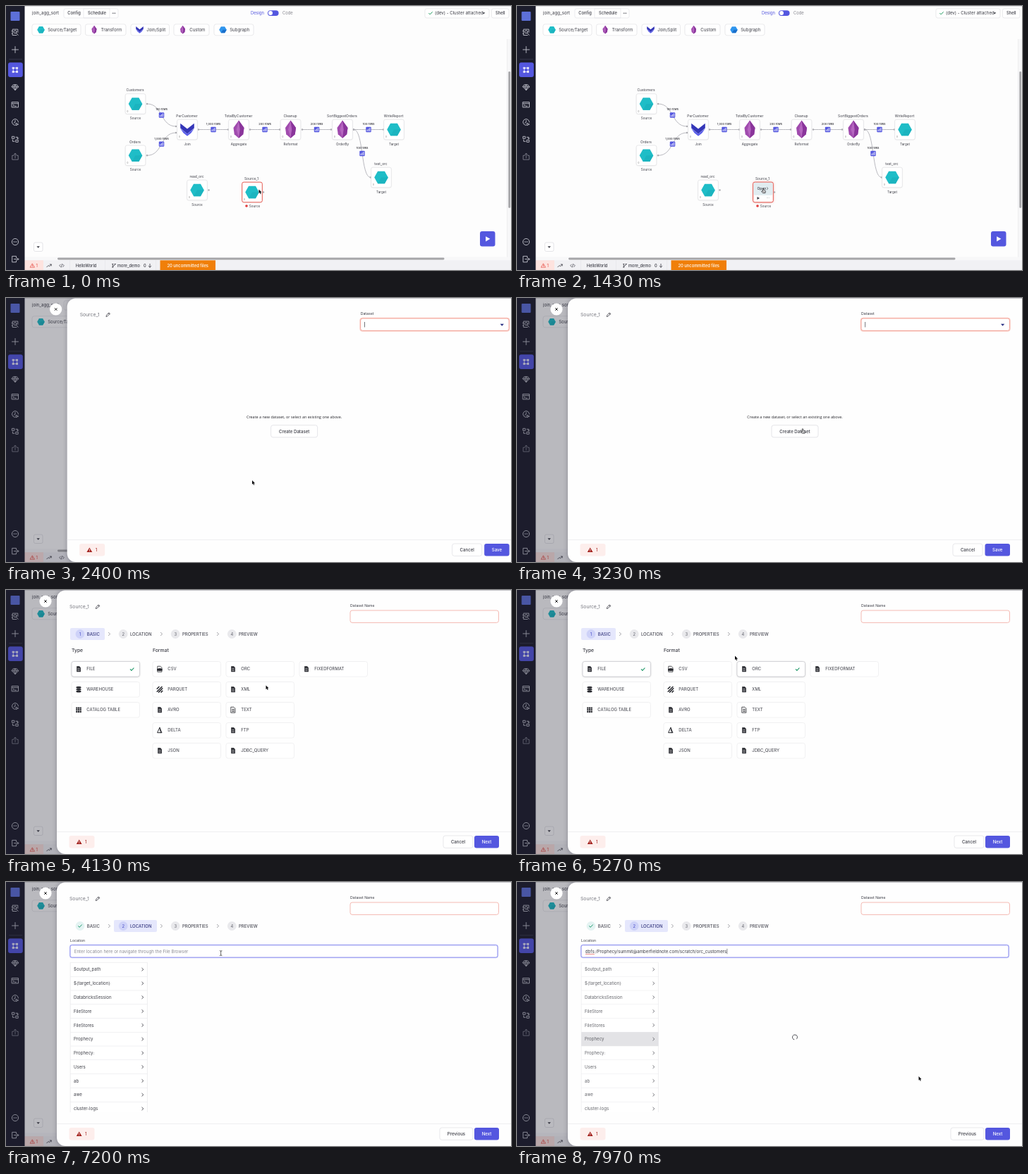
Write an HTML page with a canvas that moves like this. It is 716 px wide and 375 px high and loops after 8000 ms.

```html
<!DOCTYPE html>
<html lang="en">
<head>
<meta charset="utf-8">
<title>Pipeline editor</title>
<style>
  html, body { margin: 0; width: 100%; height: 100%; overflow: hidden; background: #fff; }
  canvas { display: block; width: 716px; height: 375px; }
</style>
</head>
<body>
<canvas id="stage"></canvas>
<script>
const W = 716, H = 375, LOOP = 8000;
const INDIGO = '#5457df', INK = '#3b3c45', RED = '#e5483f';
const canvas = document.getElementById('stage');
const c = canvas.getContext('2d');
const dpr = window.devicePixelRatio || 1;
canvas.width = W * dpr;
canvas.height = H * dpr;

// Moments of the story, in ms
const T = { hover: 1340, open: 2133, wizard: 3500, orc: 4650, location: 6120, tab: 6200, list: 6650, focus: 7000, paste: 7600 };

const clamp = v => Math.max(0, Math.min(1, v));
const span = (t, from, length) => clamp((t - from) / length);
const ease = p => p < .5 ? 2 * p * p : 1 - 2 * (1 - p) * (1 - p);

function rect(x, y, w, h, r, fill, stroke, lw = .6) {
  c.beginPath();
  c.roundRect(x, y, w, h, r);
  paint(fill, stroke, lw);
}
function paint(fill, stroke, lw = .8) {
  if (fill) { c.fillStyle = fill; c.fill(); }
  if (stroke) { c.strokeStyle = stroke; c.lineWidth = lw; c.stroke(); }
}
function circle(x, y, r, fill, stroke, lw) {
  c.beginPath();
  c.arc(x, y, r, 0, Math.PI * 2);
  paint(fill, stroke, lw);
}
function poly(points, fill) {
  c.beginPath();
  for (let i = 0; i < points.length; i += 2) c.lineTo(points[i], points[i + 1]);
  c.closePath();
  paint(fill);
}
function icon(x, y, d, fill, stroke, lw, scale = 1) {
  c.save();
  c.translate(x, y);
  c.scale(scale, scale);
  const path = new Path2D(d);
  c.lineJoin = c.lineCap = 'round';
  if (fill) { c.fillStyle = fill; c.fill(path); }
  if (stroke) { c.strokeStyle = stroke; c.lineWidth = lw || .8; c.stroke(path); }
  c.restore();
}
// y is the middle of the capital letters
function text(s, x, y, size, color = INK, align = 'left', weight = 400, family = 'Inter') {
  c.font = `${weight} ${size}px ${family}, sans-serif`;
  c.textAlign = align;
  c.fillStyle = color;
  c.fillText(s, x, y + size * .36);
}
const shadow = (color, blur, y = 0) => {
  c.shadowColor = color;
  c.shadowBlur = blur * dpr;
  c.shadowOffsetY = y * dpr;
};
const noShadow = () => shadow('transparent', 0);

const CHECK = 'M-2.4 .1L-.8 1.8L2.4 -1.7';
const CHEVRON = 'M-1 -1.9L1 0L-1 1.9';
const DOWN = 'M-2.2 -1.1H2.2L0 1.4Z';
const PLAY = 'M-1.5 -2L2 0L-1.5 2Z';

function hexagon(x, y, s) {
  poly([x - s, y, x - s / 2, y - s * .9, x + s / 2, y - s * .9, x + s, y, x + s / 2, y + s * .9, x - s / 2, y + s * .9], '#1fbdc7');
  poly([x, y, x + s, y, x + s / 2, y + s * .9, x - s / 2, y + s * .9], '#1bb4bf');
}
function gem(x, y, s) {
  poly([x, y - s, x + s * .58, y - s * .2, x + s * .48, y + s * .52, x, y + s * .95, x - s * .48, y + s * .52, x - s * .58, y - s * .2], '#a04bae');
  poly([x, y - s, x + s * .14, y, x, y + s * .95, x - s * .26, y], '#b566c0');
  poly([x, y - s, x + s * .58, y - s * .2, x + s * .48, y + s * .52, x, y + s * .95, x + s * .14, y], '#8a359b');
}
function joinMark(x, y, s) {
  poly([x - s, y - s * .15, x, y + s * .6, x + s, y - s * .15, x + s * .55, y + s * .5, x, y + s * .95, x - s * .55, y + s * .5], '#5a5eea');
  poly([x - s, y - s * .9, x, y - s * .1, x + s, y - s * .9, x + s, y - s * .2, x, y + s * .6, x - s, y - s * .2], '#3436b8');
}
function cube(x, y, s) {
  poly([x - s, y, x - s / 2, y - s * .85, x + s / 2, y - s * .85, x + s, y, x + s / 2, y + s * .85, x - s / 2, y + s * .85], '#2f95ee');
  poly([x, y, x + s, y, x + s / 2, y + s * .85, x - s / 2, y + s * .85], '#1b6fcb');
}

const nodes = [
  ['Customers', 'Source', 183.5, 139, hexagon], ['Orders', 'Source', 183.5, 212.3, hexagon],
  ['PerCustomer', 'Join', 257, 175.5, joinMark], ['TotalByCustomer', 'Aggregate', 330, 175.5, gem],
  ['Cleanup', 'Reformat', 403.5, 175.5, gem], ['SortBiggestOrders', 'OrderBy', 477, 175.5, gem],
  ['WriteReport', 'Target', 550, 175.5, hexagon], ['test_orc', 'Target', 532, 243.5, hexagon],
  ['read_orc', 'Source', 271, 261.5, hexagon]
];
const edges = [
  [200, 139, 241, 171, '100 rows'], [200, 212.3, 241, 180, '1,000 rows'],
  [273, 175.5, 315, 175.5, '1,000 rows'], [346, 175.5, 388, 175.5, '200 rows'],
  [420, 175.5, 461, 175.5, '200 rows'], [493, 175.5, 535, 175.5, '100 rows'],
  [493, 175.5, 517, 243.5, '100 rows']
];

function drawEdge([x1, y1, x2, y2, rows]) {
  const mx = (x1 + x2) / 2, my = (y1 + y2) / 2;
  c.beginPath();
  c.moveTo(x1, y1);
  c.bezierCurveTo(mx + 2, y1, mx - 2, y2, x2, y2);
  paint(null, '#a9a9b0', .8);
  circle(x1, y1, 1.2, '#aaaab0');
  circle(x2, y2, 1.2, '#aaaab0');
  rect(mx - 3.7, my - 3.7, 7.4, 7.4, 1, INDIGO);
  icon(mx, my, 'M-1.9 2V.5M0 2V-.7M1.9 2V-2', null, '#fff', .9);
  text(rows, mx, my - 8, 3.9, '#2c2c33', 'center', 500);
}
function drawBox(x, y, stroke) {
  shadow('rgba(0,0,0,.09)', 2, .5);
  rect(x - 14.3, y - 14.3, 28.6, 28.6, 2.5, '#fff', null);
  noShadow();
  rect(x - 14.3, y - 14.3, 28.6, 28.6, 2.5, null, stroke, stroke === RED ? .9 : .6);
}
function drawNode([name, kind, x, y, mark]) {
  drawBox(x, y, '#dcdce0');
  mark(x, y, mark === gem ? 13 : 9.8);
  text('0', x - 11, y + 10.5, 3, '#666', 'center');
  text(name, x - .5, y - 19.4, 4.9, INK, 'center');
  text(kind, x, y + 20.4, 4.6, INK, 'center');
}
function drawSource1(t) {
  const x = 349, y = 264.5, p = span(t, T.hover, 90), hovered = t < T.open;
  if (p && hovered) shadow('rgba(232,70,60,.5)', 3.5 * p);
  rect(x - 14.3, y - 14.3, 28.6, 28.6, 3, '#fff');
  noShadow();
  drawBox(x, y, RED);
  c.globalAlpha = 1 - p;
  hexagon(x, y, 9.8);
  text('0', x - 11, y + 10, 3, '#666', 'center');
  c.globalAlpha = p;
  if (p) {
    if (hovered) rect(x - 13.7, y - 13.7, 27.4, 18, 2, 'rgba(205,224,230,.6)');
    text('Open', x - 8.5, 259.2, 5, INK, 'left', 500);
    icon(355.2, 259.2, CHEVRON, null, INK, .8, .8);
    icon(342, 273, PLAY, INK);
    text('…', 356, 271.6, 5, INK, 'center');
  }
  c.globalAlpha = 1;
  circle(365, 264.5, 1.2, '#aaaab0');
  text('Source_1', x - 1, 245.2, 4.9, INK, 'center');
  circle(341, 284, 1.8, '#e23b3b');
  text('Source', 352.5, 284.4, 4.6, INK, 'center');
}

function drawEditor(t) {
  rect(26, 0, 690, 375, 0, '#fdfdfd');
  rect(26, 0, 690, .8, 0, '#d9d9dd');
  text('join_agg_sort', 37, 10, 6.1);
  rect(82, 3.8, 77, 13.2, 2.5, '#fff', '#e0e0e4');
  rect(110, 3.8, 37, 13.2, 0, null, '#e0e0e4');
  text('Config', 96.5, 10.2, 5.8, INK, 'center', 500);
  text('Schedule', 129, 10.2, 5.8, INK, 'center', 500);
  [-1.8, 0, 1.8].forEach(d => circle(153 + d, 10.2, .6, INK));
  text('Design', 347, 10, 5.8, INDIGO);
  rect(371, 6.2, 15.6, 7.8, 3.9, INDIGO);
  circle(375, 10.1, 3, '#fff');
  text('Code', 392, 10, 5.8, '#85858d');
  rect(594, 3.8, 91, 13.2, 2.5, '#fff', '#dcdce0');
  icon(602, 10.2, CHECK, null, '#2fa36b', 1);
  text('(dev) - Cluster attached', 608, 10.2, 6.1);
  icon(677.3, 10.3, DOWN, INK, null, 0, .9);
  rect(688.5, 3.8, 24.5, 13.2, 2.5, '#fff', '#dcdce0');
  text('Shell', 700.7, 10.2, 5.8, INK, 'center', 500);

  [[37, 69, 'Source/Target', hexagon], [112.5, 57.5, 'Transform', gem], [177, 54.5, 'Join/Split', joinMark],
   [238, 50, 'Custom', gem], [295, 56, 'Subgraph', cube]].forEach(([x, w, label, mark]) => {
    rect(x, 25.8, w, 16, 3, '#fff', '#dcdce0');
    mark(x + 12.5, 33.8, mark === gem ? 6 : 5.3);
    text(label, x + 22.2, 33.8, 6.1);
  });

  edges.forEach(drawEdge);
  circle(287.5, 261.5, 1.2, '#aaaab0');
  nodes.forEach(drawNode);
  drawSource1(t);

  rect(39.5, 336, 12.5, 12.5, 2, '#fff', '#d4d4d9');
  icon(45.7, 342.4, DOWN, INK);
  rect(672, 320, 21.5, 21.5, 3, INDIGO);
  icon(682.8, 330.8, PLAY, '#fff', null, 0, 1.8);

  rect(710.6, 47, 5.4, 311, 0, '#f7f7f8');
  rect(710.4, 47, .6, 311, 0, '#e6e6e9');
  rect(712.3, 93, 2.8, 194, 1.4, '#a5a5a8');
  rect(26, 356.6, 690, 4.6, 0, '#f8f8f9');
  rect(73, 357.5, 548.5, 2.9, 1.4, '#a5a5a8');

  rect(26, 361.2, 690, 14, 0, '#f1f1f4');
  rect(26, 361.2, 27, 14, 0, '#fde3df');
  icon(37.5, 368.8, 'M0 -2.6L3 2.4H-3ZM0 -.8V.8', null, RED, .7);
  text('1', 42.5, 368.8, 5.8, RED);
  icon(61, 368.8, 'M-3.2 2L-1 -.3L.7 1L3.2 -1.8M1.2 -1.8H3.2V.2', null, INK, .8);
  icon(79, 368.8, 'M-1.6 -1.8L-3.3 0L-1.6 1.8M1.6 -1.8L3.3 0L1.6 1.8M.6 -2.2L-.6 2.2', null, INK, .7);
  text('HelloWorld', 113.5, 368.8, 5.7, INK, 'center', 500);
  icon(153, 368.8, 'M-1.7 -2V2M1.7 -2C1.7 .5 -1.7 0 -1.7 1.5M-2.4 2.3H-1M-2.4 -2.3H-1M1 -2.3H2.4', null, INK, .8);
  text('more_demo', 158, 368.8, 5.7, INK, 'left', 500);
  text('0', 195, 368.8, 5.7, INK, 'left', 500);
  icon(204, 368.8, 'M0 -2.4V2.4M-1.9 .6L0 2.4L1.9 .6', null, INK, .8);
  rect(218.5, 361.2, 78.5, 14, 0, '#f07f09');
  text('20 uncommitted files', 257.7, 368.8, 5.8, '#fff', 'center', 500);
  [90, 140, 212].forEach(x => rect(x, 361.2, .5, 14, 0, '#e2e2e6'));
}

function drawSidebar() {
  rect(0, 0, 26.5, 375, 0, '#1c1d2c');
  rect(6.5, 8, 13, 13, 1, '#5d70d8');
  rect(4, 75.5, 19, .6, 0, '#44455a');
  rect(3, 80.3, 20.8, 20.8, 3, INDIGO);
  const line = (y, d, color = '#c3c4cf') => icon(13, y, d, null, color, .9);
  line(37.3, 'M2 4.2H-3.8V-4.2H3.8V0M-3.8 -1.8H-4.8M-3.8 1.8H-4.8M2 -.6A2 2 0 1 1 -2 -.6A2 2 0 1 1 2 -.6M1.4 1L4.2 4');
  line(62, 'M-4.5 0H4.5M0 -4.5V4.5');
  icon(13, 90.8, 'M-3.6 -3.6H-1.8V-1.8H-3.6ZM1.8 -3.6H3.6V-1.8H1.8ZM-3.6 1.8H-1.8V3.6H-3.6ZM1.8 1.8H3.6V3.6H1.8ZM-1.8 -2.7H1.8M-1.8 2.7H1.8M-2.7 -1.8V1.8M2.7 -1.8V1.8', '#fff', '#fff', .7);
  line(115.6, 'M-2.5 -3.7H2.5L4.6 -.8L0 4L-4.6 -.8ZM-4.6 -.8H4.6M-1.7 -.8L0 4L1.7 -.8L0 -3.7Z');
  line(140.2, 'M-4.5 -3.7H4.5V3.7H-4.5ZM-4.5 -1.6H4.5M-2.8 -.1L-1.5 1L-2.8 2M-.5 2H1.4');
  line(165, 'M4.4 0A4.4 4.4 0 1 0 0 4.4M0 -2.5V0L-1.8 1.2M1.4 1.4L4.6 3L1.6 4.5Z');
  line(189.3, 'M-4.2 -4H-1.2V-1H-4.2ZM1.2 1H4.2V4H1.2ZM1 -3H3.6V-.5M2.5 -1.5L3.6 -.4L4.6 -1.5M-1 3H-3.6V.7');
  line(214, 'M-2.2 -1.7H-4.2V4.2H4.2V-1.7H2.2M0 2V-4.6M-2 -2.7L0 -4.6L2 -2.7', '#7f808e');
  circle(13, 335, 4.6, null, '#c3c4cf', .9);
  [-2, 0, 2].forEach(d => circle(13 + d, 335, .7, '#c3c4cf'));
  line(359.6, 'M1.5 -2V-4.2H-4.3V4.2H1.5V2M-1.5 0H4.8M3 -1.8L4.8 0L3 1.8');
}

function button(x, w, label, primary) {
  rect(x, 349, w, 17.4, 3, primary ? INDIGO : '#fff', primary ? null : '#d9d9de');
  text(label, x + w / 2, 357.8, 6.1, primary ? '#fff' : INK, 'center', 500);
}

function drawChooser(t) {
  text('Dataset', 488, 22, 5.2);
  rect(486.7, 27.7, 213, 20, 4, '#fbd3cc');
  rect(488, 29, 210.5, 17.4, 3, '#fff', '#ef8f82', .8);
  if ((t - 2150) % 1000 < 500) rect(493.4, 34, .7, 7.6, 0, INK);
  icon(688.6, 38, DOWN, '#2b3184', null, 0, 1.2);
  text('Create a new dataset, or select an existing one above.', 394, 169, 5.45, '#26262c', 'center', 400, '"Open Sans"');
  rect(361, 180.7, 66, 17.2, 3, '#fff', '#d4d4da');
  text('Create Dataset', 394, 189.4, 6.1, INK, 'center', 500);
  button(618, 42, 'Cancel');
  button(663.5, 35.5, 'Save', true);
}

function drawSteps(t) {
  const onLocation = t >= T.location;
  const tab = t < T.tab ? 0 : 1;
  if (tab) rect(153, 54, 61, 17, 2, '#e5e7fc');
  else rect(91, 54, 49, 17, 2, '#e5e7fc');
  [[105, 'BASIC'], [166.2, 'LOCATION'], [240.2, 'PROPERTIES'], [320.3, 'PREVIEW']].forEach(([x, label], i) => {
    const done = onLocation && i === 0, active = i === (onLocation ? 1 : 0);
    circle(x, 62.5, 6.4, done ? '#e4f3f2' : active ? '#ced2f8' : '#e9e9ec');
    if (done) icon(x, 62.5, CHECK, null, '#1d9a6c', 1);
    else text(i + 1, x, 62.5, 5.8, active ? '#3f43c4' : '#5f606a', 'center');
    text(label, x + 9.7, 62.6, 6, i === tab ? '#35387f' : '#4c4d57', 'left', 500);
  });
  [146.5, 220.5, 300.5].forEach(x => icon(x, 62.5, CHEVRON, null, '#85858d', .7, 1.1));
}

const DOC = 'M-2.8 -4H1L2.9 -2.1V4H-2.8Z';
function formatIcon(kind, x, y) {
  const dark = '#26272d';
  if (kind === 'WAREHOUSE') {
    [-2.9, 0, 2.9].forEach(d => { c.beginPath(); c.ellipse(x, y + d, 3.6, 1.4, 0, 0, 7); paint(dark); });
  } else if (kind === 'CATALOG TABLE') {
    for (let i = 0; i < 9; i++) rect(x - 3.8 + i % 3 * 2.7, y - 3.8 + Math.floor(i / 3) * 2.7, 2.2, 2.2, 0, dark);
  } else if (kind === 'PARQUET') {
    icon(x, y, 'M-3.8 -1L-1 -3.8M-3.8 3L3 -3.8M-1.5 3.8L3.8 -1.5M2 3.8L3.8 2', null, dark, 1.5);
  } else if (kind === 'DELTA') {
    icon(x, y, 'M0 -3.6L3 3.4H-3ZM0 -3.6L1.2 3.4', null, dark, 1);
  } else if (kind === 'TEXT' || kind === 'CSV') {
    icon(x, y, DOC + 'M-1.3 -1H1.4M-1.3 .7H1.4M-1.3 2.3H1.4', null, dark, .8);
    if (kind === 'CSV') rect(x - 3.9, y - .6, 7.4, 3, .5, dark);
  } else {
    icon(x, y, DOC, dark);
    icon(x, y, 'M-1.4 -1H1.4M-1.4 .7H1.4M-1.4 2.3H1.4', null, '#fff', .5);
  }
}
const columns = [
  [93, ['FILE', 'WAREHOUSE', 'CATALOG TABLE']],
  [208, ['CSV', 'PARQUET', 'AVRO', 'DELTA', 'JSON']],
  [312, ['ORC', 'XML', 'TEXT', 'FTP', 'JDBC_QUERY']],
  [416, ['FIXEDFORMAT']]
];
function drawFormats(t) {
  text('Type', 93, 85.5, 6.8, INK, 'left', 500);
  text('Format', 208, 85.5, 6.8, INK, 'left', 500);
  columns.forEach(([x, labels]) => labels.forEach((label, i) => {
    const y = 112.3 + i * 29;
    const chosen = label === 'FILE' || label === 'ORC' && t >= T.orc;
    if (chosen) shadow('rgba(0,0,0,.2)', 2.5, .5);
    rect(x, y - 10.8, 96.5, 21.6, 3, '#fff');
    noShadow();
    rect(x, y - 10.8, 96.5, 21.6, 3, null, chosen ? '#bcbcc3' : '#e7e7ea');
    formatIcon(label, x + 10, y);
    text(label, x + 21.3, y, 6, INK);
    if (chosen) icon(x + 85.7, y + .3, CHECK, null, '#259b6c', 1.1);
  }));
}

const folders = ['$output_path', '${target_location}', 'DatabricksSession', 'FileStore', 'FileStores', 'Prophecy', 'Prophecy:', 'Users', 'ab', 'awe', 'cluster-logs'];
function drawFolders(pasted) {
  c.save();
  c.beginPath();
  c.rect(90, 113.5, 112, 213.5);
  c.clip();
  c.globalAlpha = pasted ? .8 : 1;
  rect(91.2, 114.3, 109.2, 230, 0, '#fff', '#e2e2e6');
  folders.forEach((name, i) => {
    const y = 124.2 + i * 19.78;
    if (pasted && i === 5) rect(91.2, y - 9.9, 109.2, 19.8, 0, '#dcdce0');
    rect(91.2, y + 9.7, 109.2, .5, 0, '#e4e4e8');
    text(name, 96, y, 6.1, '#3d3e46');
    icon(193.8, y, CHEVRON, null, INK, .9);
  });
  c.restore();
}
function drawLocation(t) {
  const focused = t >= T.focus, pasted = t >= T.paste;
  text('Location', 91, 82.8, 5.2);
  if (focused) rect(89.8, 88.5, 608.4, 19.8, 3.5, '#d9dbfb');
  rect(91, 89.7, 606, 17.4, 2.5, '#fff', focused ? '#6f73ea' : '#d0d0d6', .8);
  let caret = 96.8;
  if (pasted) {
    const path = 'dbfs:/Prophecy/summit@amberfieldnote.com/scratch/orc_customers';
    text(path, 96.8, 98.5, 6.15, '#3a3b43');
    caret += c.measureText(path).width + .3;
    rect(97, 102, c.measureText('dbfs').width, .7, 0, '#e6605a');
  } else {
    text('Enter location here or navigate through the File Browser', 96.8, 98.5, 6.15, '#8b8b93');
  }
  if (focused && (t - T.paste + 1000) % 1000 < 500) rect(caret, 94.8, .6, 7.4, 0, INK);
  if (t >= T.list) drawFolders(pasted);
  if (t < T.list || pasted) {
    const a = t / 600 * Math.PI * 2;
    c.beginPath();
    c.arc(394, 220.5, 3.4, a, a + 5.4);
    paint(null, '#3a3b42', .9);
  }
}

function drawDrawer(t) {
  const p = ease(span(t, T.open, 300));
  rect(0, 0, W, H, 0, `rgba(28,29,44,${.3 * p})`);
  c.save();
  c.translate(644 * (1 - p), 0);
  shadow('rgba(20,20,40,.28)', 6);
  rect(72, .6, 660, 374.4, [12, 0, 0, 12], '#fefefe');
  noShadow();
  circle(56, 16, 8.6, '#fff');
  icon(56, 16, 'M-1.5 -1.5L1.5 1.5M1.5 -1.5L-1.5 1.5', null, '#222', 1);
  text('Source_1', 90, 23.6, 6.8, '#74757d');
  icon(130, 23.6, 'M-2.6 2.6L-2.1 .7L1.3 -2.7L2.7 -1.3L-.7 2.1ZM.5 -1.9L1.9 -.5', null, INK, .8);
  rect(72, 343.2, 644, .7, 0, '#e9e9ec');
  rect(89.5, 349, 36, 17.4, 3, '#fdeeec');
  icon(103.7, 357.7, 'M0 -3.3L3.9 3.2H-3.9Z', '#a3201c');
  rect(103.3, 356.4, .8, 2.3, 0, '#fff');
  rect(103.3, 359.3, .8, .8, 0, '#fff');
  text('1', 112, 357.8, 6.1, '#a3201c');
  if (t < T.wizard) {
    drawChooser(t);
  } else {
    text('Dataset Name', 488, 22, 5.2);
    rect(488, 29, 210.5, 17.4, 3, '#fff', '#f2a9a0', .8);
    drawSteps(t);
    if (t < T.location) {
      drawFormats(t);
      button(620, 42, 'Cancel');
    } else {
      drawLocation(t);
      button(615, 47, 'Previous');
    }
    button(664, 35, 'Next', true);
  }
  c.restore();
}

const trail = [
  [0, 358.5, 260.5], [900, 358.5, 260.5], [1330, 349, 259], [2600, 349, 259], [3050, 405, 185.5],
  [3600, 405, 185.5], [4500, 350, 110], [4900, 350, 110], [5270, 309, 93.5], [5950, 199.5, 68.5],
  [6450, 199.5, 68.5], [6850, 300, 98], [7150, 300, 98], [7700, 569.5, 276], [LOOP, 569.5, 276]
];
const handTimes = [[T.hover, T.open], [2960, T.wizard], [4300, 5200], [5800, 6500]];
function drawCursor(t) {
  const i = trail.findIndex(k => k[0] > t);
  const [t0, x0, y0] = trail[i - 1], [t1, x1, y1] = trail[i];
  const p = ease((t - t0) / (t1 - t0));
  const x = x0 + (x1 - x0) * p, y = y0 + (y1 - y0) * p;
  if (handTimes.some(([from, to]) => t >= from && t < to)) {
    icon(x, y, 'M-.8 .6Q0 -.5 .8 .6V2.9L3.2 3.5Q4 3.8 3.8 5L3.3 7.4H-.6L-2.7 4.6Q-2.6 3.6 -.8 4.6Z', '#fff', '#16161a', .8, .9);
    icon(x, y, 'M.9 4.8V6.2M2.2 4.8V6.2', null, '#16161a', .5, .9);
  } else if (t > 6750 && t < 7230) {
    icon(x, y, 'M-1.3 -3.5Q0 -3.5 0 -2.6V2.6Q0 3.5 -1.3 3.5M1.3 -3.5Q0 -3.5 0 -2.6M0 2.6Q0 3.5 1.3 3.5', null, '#222', .7);
  } else {
    const arrow = 'M0 0V5.8L1.3 4.6L2.2 6.7L3.2 6.3L2.3 4.2H4.1Z';
    icon(x, y, arrow, null, '#fff', 1.1);
    icon(x, y, arrow, '#0b0b0e');
  }
}

function draw(t) {
  c.setTransform(dpr, 0, 0, dpr, 0, 0);
  c.clearRect(0, 0, W, H);
  drawEditor(t);
  drawSidebar();
  if (t >= T.open) drawDrawer(t);
  drawCursor(t);
}

const start = performance.now();
function tick() {
  draw((performance.now() - start) % LOOP);
  requestAnimationFrame(tick);
}
tick();
</script>
</body>
</html>
```
